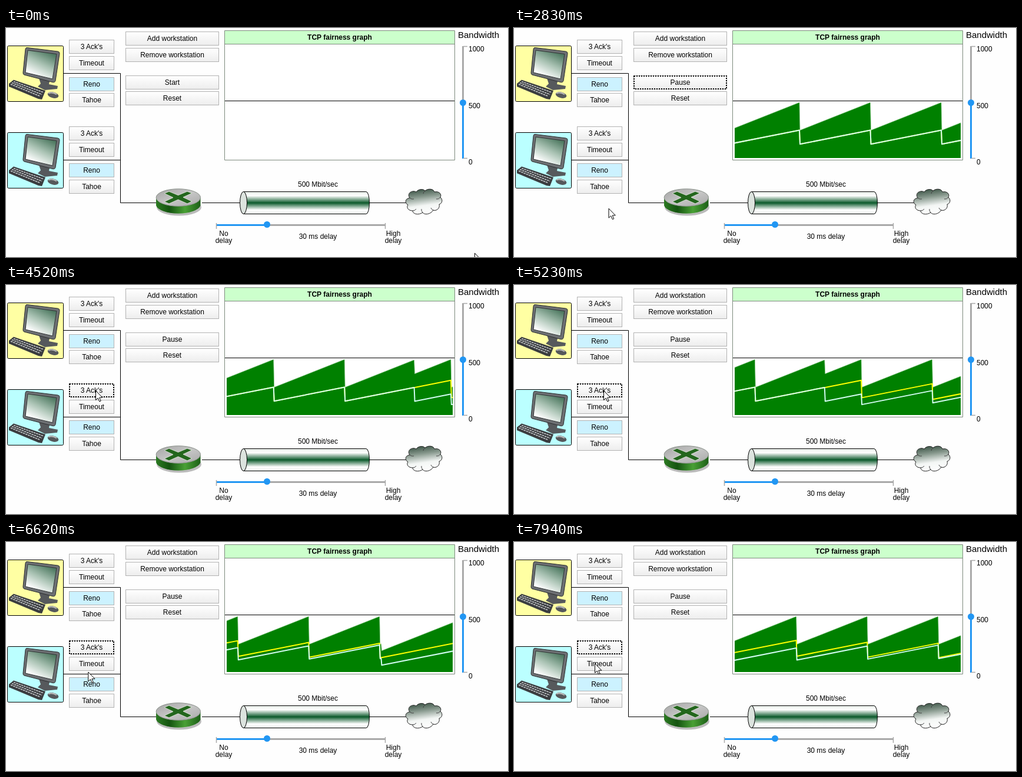
Animation, 853 px wide and 391 px high, one loop 7990 ms. Source, as an HTML page:

```html
<!DOCTYPE html>
<html lang="en">
<head>
<meta charset="utf-8">
<title>TCP fairness</title>
<style>
html, body { margin: 0; width: 100%; height: 100%; overflow: hidden; background: #fefefe; }
svg { display: block; }
text { font: 12px "Liberation Sans", Arial, sans-serif; text-anchor: middle; }
.left { text-anchor: start; }
.title { font-weight: bold; }
.wire { fill: none; stroke: #000; }
</style>
</head>
<body>
<svg id="stage" width="853" height="391" viewBox="0 0 853 391">
  <defs>
    <linearGradient id="face" x2="0" y2="1"><stop stop-color="#fff"/><stop offset="1" stop-color="#ededed"/></linearGradient>
    <linearGradient id="screen" x1=".8" y1=".1" x2=".3" y2="1">
      <stop stop-color="#4f7a62"/><stop offset=".45" stop-color="#a9c2b3"/><stop offset=".9" stop-color="#fff"/>
    </linearGradient>
    <linearGradient id="pipe" x2="0" y2="1">
      <stop stop-color="#e4ebe6"/><stop offset=".18" stop-color="#fff"/>
      <stop offset=".5" stop-color="#0c5a2c"/><stop offset=".82" stop-color="#fff"/><stop offset="1" stop-color="#e9efeb"/>
    </linearGradient>
    <linearGradient id="cloud" x1=".4" x2=".6" y2="1">
      <stop stop-color="#3d5547"/><stop offset=".3" stop-color="#87988d"/><stop offset=".65" stop-color="#f3f6f4"/><stop offset="1" stop-color="#fff"/>
    </linearGradient>
    <linearGradient id="side"><stop stop-color="#2c7a22"/><stop offset=".3" stop-color="#145410"/><stop offset=".65" stop-color="#49a035"/><stop offset="1" stop-color="#1c5f17"/></linearGradient>
    <linearGradient id="lid" x2="1" y2="1"><stop stop-color="#a3a3a3"/><stop offset=".5" stop-color="#c6c6c6"/><stop offset="1" stop-color="#a9a9a9"/></linearGradient>
    <clipPath id="plot"><rect id="plotArea" x="375" y="110" height="112"/></clipPath>
    <g id="computer">
      <path d="M56 86L74 91 73 96 88 99 87 104 66 106 54 100 59 95Z" fill="#56595c"/>
      <path d="M36 33.500L88 40Q91.500 40.500 91 44L84 90Q83 93.500 79 92.500L31 80Q28.500 79 29 76L33 36Q33.500 33 36 33.500Z" fill="#6d7073" stroke="#2a2c2e"/>
      <path d="M37 38L86 44.500 79 87 33 76Z" fill="url(#screen)" stroke="#303335"/>
      <path d="M5 95L13 88.500 67 107 61 122 55 121 5 100Z" fill="#3a3c3f"/>
      <path d="M8 96L58 116.500M10 93.500L61 113.500M13 91.500L64 110" stroke="#c6c9cc" stroke-width="1.600" stroke-dasharray="3.500 1" fill="none"/>
      <ellipse cx="80" cy="114.500" rx="9.500" ry="5" fill="#55585b" transform="rotate(14 80 114.500)"/>
      <path d="M72 111.500Q79 108.500 86 113.500" fill="none" stroke="#bbb" stroke-width="2"/>
    </g>
  </defs>

  <path class="wire" d="M98 77.500H194.500V298.500H256M98 225.500H194M333 298.500H398M617 298.500H680"/>
  <g id="stations"></g>
  <g id="buttons"></g>

  <g id="router">
    <ellipse cx="294" cy="306" rx="38" ry="14.500" fill="#bbb"/>
    <path d="M255 290V303A38 15.500 0 0 0 330.500 303V290Z" fill="url(#side)"/>
    <ellipse cx="292.800" cy="289.500" rx="37.700" ry="14.800" fill="url(#lid)" stroke="#8a918a"/>
    <path d="M269 282.500L277 279 292.500 285.500 308 279 316 282 301 289 316 296 308 300 292.500 293 277 300 269 296.500 284 289.500Z" fill="#23661d" stroke="#d4dcd0"/>
  </g>

  <path d="M403 279.500H612A5.500 19 0 0 1 612 317.500H403Z" fill="url(#pipe)" stroke="#000"/>
  <ellipse cx="403.500" cy="298.500" rx="6" ry="19" fill="#dce3de" stroke="#000"/>
  <path d="M686 290C680 282 691 276 697 280C700 275 709 274 712 278C718 273 727 275 728 280C736 278 741 284 738 289C743 293 741 300 736 301C738 308 731 313 726 311C722 318 711 320 708 315C701 320 691 318 691 312C683 312 680 306 683 302C677 299 678 291 686 290Z" fill="url(#cloud)" stroke="#222"/>
  <path d="M686 290Q689 293 693 292M712 278Q709 280 709 283M738 289Q735 293 731 292M708 315Q705 312 706 309M691 312Q695 312 697 309M726 311Q723 310 722 307" fill="none" stroke="#444"/>
  <text x="530" y="271">500 Mbit/sec</text>

  <rect x="371.500" y="4.500" width="391" height="221" fill="#fff"/>
  <path d="M372 5H762V27H372Z" fill="#cfc"/>
  <path d="M371.500 4.500H762.500V225.500H371.500ZM372 27.500H762" fill="none" stroke="#7d8a7d"/>
  <text class="title" x="567" y="20">TCP fairness graph</text>
  <g clip-path="url(#plot)"><g id="history" fill="none" stroke-linejoin="round">
    <path id="total" fill="green" stroke="#9fd39f" stroke-width=".8"/>
    <path id="first" stroke="#ff0" stroke-width="2"/>
    <path id="second" stroke="#d2fbf2" stroke-width="2"/>
  </g></g>
  <path class="wire" d="M372 124.500H762"/>

  <g fill="none" stroke="#a9a9a9" stroke-width="3">
    <path d="M776.500 31V127M443 336.500H645"/>
    <path d="M776.500 127V223M357 336.500H443" stroke="#2196f3"/>
    <path d="M777 31.500H784M777 222.500H784M357.500 333V343M644.500 333V343" stroke-width="1.500"/>
  </g>
  <circle cx="776.500" cy="127.500" r="5.500" fill="#2196f3"/>
  <circle cx="443.500" cy="335.500" r="5.500" fill="#2196f3"/>
  <text class="left" x="768" y="17" style="font-size:15px">Bandwidth</text>
  <text class="left" x="786" y="40">1000</text>
  <text class="left" x="786" y="137">500</text>
  <text class="left" x="786" y="233">0</text>
  <text x="370" y="355">No</text><text x="370" y="367">delay</text>
  <text x="530" y="360">30 ms delay</text>
  <text x="658" y="355">High</text><text x="658" y="367">delay</text>

  <g id="cursor">
    <circle id="press" r="12" fill="#f2ec38" style="mix-blend-mode:multiply"/>
    <circle id="busy" cx="13.500" cy="-1" r="6" fill="#eaf5fd" stroke="#2a9be8" stroke-width="3.600"/>
    <path d="M.5 .5V16.500L4.200 13 6.800 19 9.200 18 6.700 12.200H11.800Z" fill="#fff" stroke="#000"/>
  </g>
</svg>
<script>
const LOOP = 7990, BASE = 222, FULL = 95, GROWTH = FULL / 478;
const START_CLICK = 583;
const byId = id => document.getElementById(id);
const show = (el, on) => el.setAttribute('visibility', on ? 'visible' : 'hidden');
const within = (t, from, to) => t >= from && t < to;

function add(parent, tag, attrs, text = '') {
  const el = document.createElementNS('http://www.w3.org/2000/svg', tag);
  for (const key in attrs) el.setAttribute(key, attrs[key]);
  el.textContent = text;
  return parent.appendChild(el);
}

function button(x, top, width, label, fill = 'url(#face)') {
  const g = byId('buttons');
  const y = Math.round(top);
  const box = { x: x + .5, y: y + .5, width: width - 1, height: 23 };
  const face = add(g, 'rect', { ...box, fill, stroke: '#b2b2b2' });
  const text = add(g, 'text', { x: x + width / 2, y: y + 16 }, label);
  const focus = add(g, 'rect', {
    x: x + 1, y: y + 1, width: width - 2, height: 22,
    fill: 'none', stroke: '#000', 'stroke-width': 2, 'stroke-dasharray': '2 2', visibility: 'hidden'
  });
  return { face, text, focus };
}

function station(y, color) {
  const g = byId('stations');
  const top = Math.round(y);
  add(g, 'rect', { x: 2.5, y: top + 30.5, width: 95, height: 95, rx: 2, fill: color, stroke: '#000' });
  add(g, 'use', { href: '#computer', y: top });
  const acks = button(107, y + 20, 77, "3 Ack's");
  button(107, y + 48, 77, 'Timeout');
  button(107, y + 83.6, 77, 'Reno', '#ccf2ff');
  button(107, y + 111, 77, 'Tahoe');
  return acks;
}

station(0, '#ffffa3');
const acks = station(147.8, '#bff');
button(203, 6, 159, 'Add workstation');
button(203, 34, 159, 'Remove workstation');
const start = button(203, 81, 159, 'Start');
button(203, 108, 159, 'Reset');

// Slow start, then additive increase with multiplicative decrease.
function simulate(end, losses) {
  const points = [];
  let a = 0, b = 0, d = 0;
  const mark = () => points.push([d, a, b]);
  for (; d <= 3.6; d += .6) {
    a = b = FULL / 2 * (d / 3.6) ** 3;
    mark();
  }
  d = 4.6;
  a = b = FULL / 4;
  mark();
  while (d < end) {
    const room = (FULL - a - b) / (2 * GROWTH);
    const early = losses.length && d + room > losses[0];
    const step = early ? losses[0] - d : room;
    d += step; a += step * GROWTH; b += step * GROWTH;
    mark();
    if (early) losses.shift(); else a /= 2;
    b /= 2;
    d += 1;
    mark();
  }
  return points;
}

const points = simulate(1850, [845, 1271.5]);
const line = value => 'M' + points.map(p => `${p[0].toFixed(2)} ${(BASE - value(p)).toFixed(2)}`).join('L');
byId('total').setAttribute('d', line(p => p[1] + p[2]) + `V${BASE + 3}H0Z`);
byId('first').setAttribute('d', line(p => p[1]));
byId('second').setAttribute('d', line(p => p[2]));

const progress = [[0, 0], [START_CLICK, 0], [1670, 251], [3770, 735], [5230, 1076], [6100, 1272], [7120, 1509], [7940, 1699]];
const path = [
  [50, 796, 384], [430, 285, 84], [640, 285, 84], [860, 292, 145], [1400, 272, 262], [1670, 268, 271],
  [1800, 268, 271], [2450, 160, 348], [2600, 160, 348], [3300, 162, 190], [3770, 157, 181], [4100, 152, 180],
  [6200, 152, 180], [6450, 143, 214], [6650, 139, 222], [6950, 137, 207]
];

function at(keys, t, ease = u => u) {
  const next = keys.findIndex(k => k[0] > t);
  if (next < 0) return keys[keys.length - 1].slice(1);
  if (!next) return keys[0].slice(1);
  const from = keys[next - 1], to = keys[next];
  const u = ease((t - from[0]) / (to[0] - from[0]));
  return from.slice(1).map((v, i) => v + (to[i + 1] - v) * u);
}

function draw(t) {
  const [length] = at(progress, t);
  byId('plotArea').setAttribute('width', length ? Math.min(384, length + 1) : 0);
  byId('history').setAttribute('transform', `translate(${Math.min(376, 759 - length)})`);

  const startDown = within(t, 480, START_CLICK);
  const acksDown = within(t, 4100, 4240) || within(t, 6020, 6180);
  start.text.textContent = t < START_CLICK ? 'Start' : 'Pause';
  start.face.setAttribute('fill', startDown ? '#ddd' : 'url(#face)');
  acks.face.setAttribute('fill', acksDown ? '#ddd' : 'url(#face)');
  show(start.focus, within(t, 480, 4100));
  show(acks.focus, t >= 4100);

  const [x, y] = at(path, t, u => u * u * (3 - 2 * u));
  byId('cursor').setAttribute('transform', `translate(${x} ${y})`);
  show(byId('press'), startDown || acksDown);
  show(byId('busy'), within(t, 3400, 4080));
}

const origin = performance.now();
function tick() {
  draw((performance.now() - origin) % LOOP);
  requestAnimationFrame(tick);
}
tick();
</script>
</body>
</html>
```
